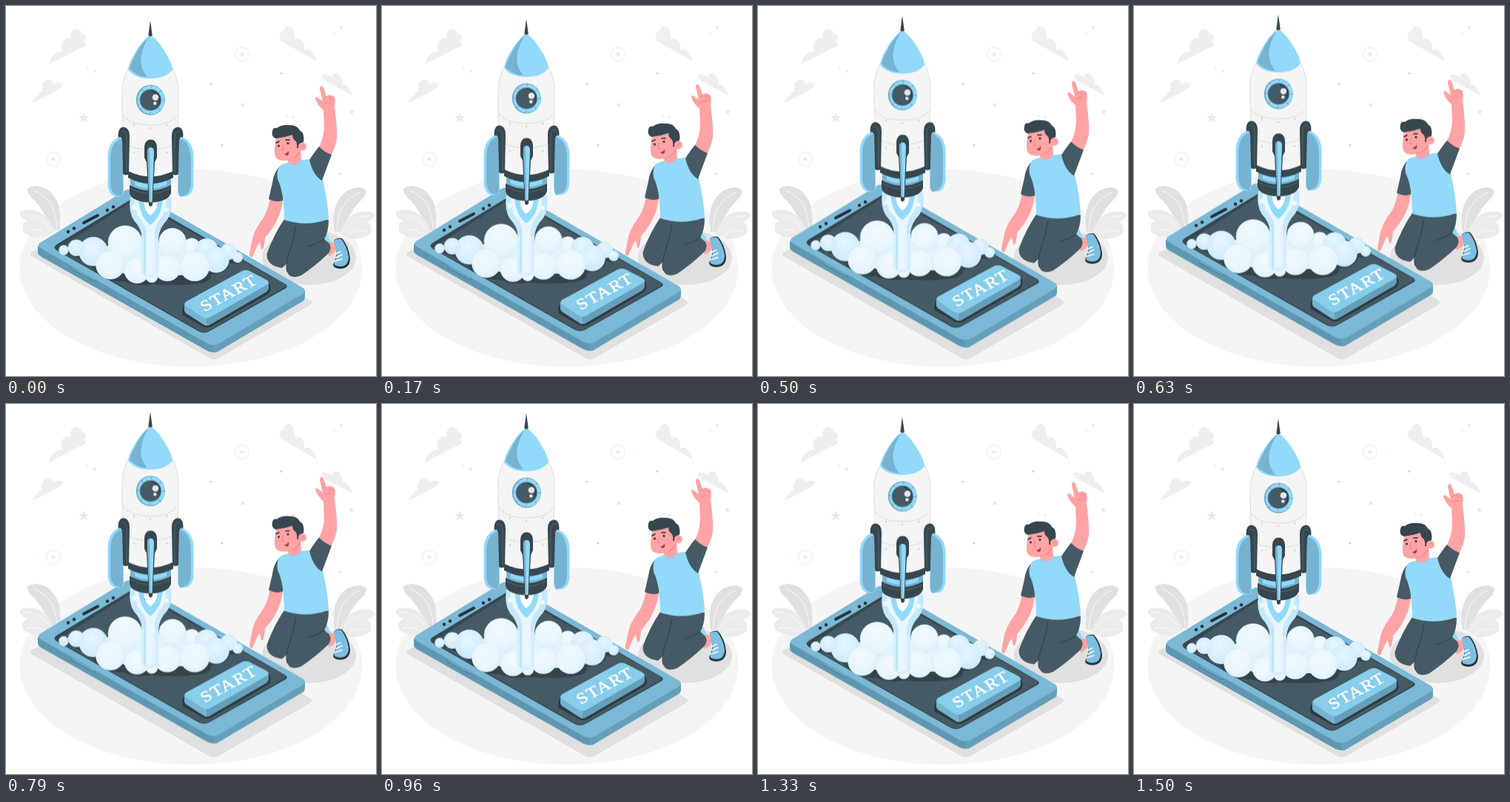
Animation of 500x500 px, one loop 1540 ms. Source, as an HTML page:

```html
<!DOCTYPE html>
<html lang="en">
<head>
<meta charset="utf-8">
<title>Rocket launch</title>
<style>
html, body { margin: 0; width: 100%; height: 100%; overflow: hidden; background: #fff; }
svg { display: block; width: 100vw; height: 100vh; }
#float { animation: float 1540ms -5ms infinite; }
/* 24 poses a second: 18 up, 18 down, one held */
@keyframes float {
  0% { transform: translateY(1px); animation-timing-function: steps(18); }
  48.65% { transform: translateY(-9px); animation-timing-function: steps(18); }
  97.3%, 100% { transform: translateY(1px); }
}
.blue { fill: #92d9fa; }
.mid { fill: #76b3d0; }
.dark { fill: #37474f; }
.slate { fill: #455a64; }
.skin { fill: #ffa3a4; }
.cloud { fill: #efefef; }
.line { fill: none; stroke-linecap: round; stroke-linejoin: round; }
</style>
</head>
<body>
<svg viewBox="0 0 500 500">
<defs>
  <radialGradient id="puff" cx=".45" cy=".35" r=".75">
    <stop offset="0" stop-color="#f1faff"/>
    <stop offset=".6" stop-color="#eaf7fe"/>
    <stop offset="1" stop-color="#d8effc"/>
  </radialGradient>
  <radialGradient id="tint" cx=".45" cy=".35" r=".8">
    <stop offset="0" stop-color="#e6f6fe"/>
    <stop offset="1" stop-color="#c8e8fa"/>
  </radialGradient>
  <path id="star" d="M0-7 2-2.2 7-2.2 3 1.2 4.4 6 0 3.2-4.4 6-3 1.2-7-2.2-2-2.2Z"/>
  <g id="target" fill="none" stroke="#e3edf1">
    <circle r="9.5"/><circle r="2.6" fill="#e3edf1" stroke="none"/>
  </g>
</defs>

<g id="sky">
  <path class="cloud" d="M58 79Q59 70 66 65Q71 60 76 62Q73 51 78 46Q82 42 87 44Q86 33 94 31Q101 30 102 38Q108 37 108 43Q107 47 104 49Q109 48 108 53Z"/>
  <path class="cloud" d="M36 131Q37 124 43 121Q44 116 49 116Q47 107 52 102Q57 98 61 101Q64 104 63 107Q69 102 76 104Q78 108 72 112Z"/>
  <path class="cloud" d="M420 75Q418 66 412 61Q408 58 403 59Q404 49 397 45Q393 43 390 45Q391 31 383 27Q376 26 376 34Q369 35 370 41Q368 45 373 48Z"/>
  <path class="cloud" d="M468 121Q467 113 461 109Q460 106 455 106Q455 97 449 92Q443 89 440 96Q433 91 427 93Q426 98 433 102Z"/>
  <g fill="#e9e9e9">
    <use href="#star" x="105" y="151"/>
    <use href="#star" transform="translate(320 134)scale(.6)"/>
    <use href="#star" transform="translate(467 143)scale(.6)"/>
  </g>
  <use href="#target" x="319" y="65"/>
  <use href="#target" x="64" y="207"/>
</g>

<ellipse cx="250" cy="354" rx="231.5" ry="133.5" fill="#f5f5f5"/>

<g id="plant">
  <path d="M72 303Q78 264 56 248Q39 239 29 247Q29 256 40 264Q52 278 62 303Z" fill="#e0e0e0"/>
  <path d="M66 305Q57 279 36 276Q20 274 18 281Q21 287 28 290Q19 296 24 306Q34 313 50 313Z" fill="#ebebeb"/>
  <path class="line" d="M38 250Q67 260 69 301M25 281Q50 282 61 304M28 303Q43 299 55 309" stroke="#f8f8f8"/>
</g>
<use href="#plant" transform="translate(516 2)scale(-1 1)"/>

<path d="M34 333Q31 336 36 339L275 476Q281 479 287 476L411 404Q416 400 410 397L180 264Q172 260 164 263Z" fill="#e0e0e0"/>
<ellipse cx="409.500" cy="340" rx="63.500" ry="37" fill="#e0e0e0"/>

<g id="float">
  <g id="phone">
    <path d="M43 323V332Q43 335 48 338L272 465Q280 469 288 465L280 440Z" fill="#5e97b1"/>
    <path d="M280 450V467Q284 468 288 465L401 398Q404 396 404 392V383Z" fill="#669fba"/>
    <path d="M46 319Q41 323 48 327L272 455Q280 459 288 455L401 388Q407 383 400 379L172 248Q166 245 160 249Z" fill="#7bb9d6"/>
    <path class="line" d="M90 354 119 370" stroke="#51879f" stroke-width="4"/>
    <path class="line" d="M90 353 119 369" stroke="#6eabc8" stroke-width="2"/>
    <g transform="translate(0 1.5)">
      <path class="dark" d="M68 320Q63 324 69 328L260 437Q268 441 275 437L378 379Q382 376 377 373L181 260Q174 256 167 260Z"/>
      <path class="slate" d="M72 324Q68 326 72 328L261 436Q268 440 275 436L376 378Q380 375 376 373L181 264Q174 260 167 264Z"/>
    </g>
    <path class="line" d="M105 292 124 282" stroke="#263238" stroke-width="4"/>
    <g id="holes" fill="#263238"></g>
    <path d="M240 405Q237 411 239 417L266 432Q272 435 278 432L354 388Q360 383 356 374Z" fill="#2c3b42"/>
    <path class="mid" d="M241 401V411Q242 414 246 416L266 429Q271 433 276 429L279 416Z"/>
    <path d="M271 418V431Q274 431 277 429L351 386Q355 383 355 380V371Z" fill="#669fba"/>
    <path d="M244 398Q239 401 244 405L265 419Q271 423 277 419L352 376Q357 372 352 369L329 357Q324 355 319 357Z" fill="#88cdec"/>
    <text transform="matrix(.88 -.48 .5 .7 268.500 412.500)" font-family="'Liberation Serif', serif" font-size="25" letter-spacing="1.5" fill="#fff" stroke="#fff" stroke-width=".6">START</text>
  </g>

  <g id="smoke" transform="translate(0 .8)">
    <path d="M72 331Q90 335 99 340Q116 350 122 358Q136 372 158 370Q178 378 198 374Q230 377 254 374Q279 372 277 361Q303 358 302 346Q318 348 321 340L300 325H100Z" fill="#33444c"/>
    <path d="M104 338 160 312 280 328 293 345 250 362H165Z" fill="#e3f4fd"/>
    <g id="puffs" stroke="#d0eaf8" stroke-width=".5"></g>
  </g>

  <g id="flame">
    <path d="M183 302V360Q195 372 206 360V302Z" fill="#d5effc"/>
    <path d="M168 257Q165 277 173 289Q183 299 184 313H206Q207 299 217 289Q226 277 223 257Z" fill="#c5e8fb"/>
    <path d="M174 260Q174 278 181 286Q190 296 189 309V362H201V309Q200 297 209 286Q217 277 216 260Z" fill="#e7f6fe"/>
    <path d="M188 303V361" class="line" stroke="#bce4f9" stroke-width="2.500"/>
    <path d="M179 258Q180 283 195 295Q211 283 212 258Z" fill="#92d9fa"/>
    <path d="M186 258Q186 276 195 282Q205 276 205 258Z" fill="#fff"/>
    <circle cx="173" cy="271" r="3.500" fill="#eef9ff"/>
    <circle cx="217" cy="274" r="3" fill="#eef9ff"/>
    <circle cx="179" cy="281" r="2" fill="#eef9ff"/>
  </g>

  <g id="rocket">
    <g id="fin">
      <path class="blue" d="M156 175Q138 180 137.500 203V241Q139 253 146 256L155 257Q159 255 159 248V176Z"/>
      <path class="mid" d="M157 178Q142 182 141 204V240Q142 250 148 254L155 256.500Q158 254 158 247Z"/>
    </g>
    <use href="#fin" transform="translate(391)scale(-1 1)"/>
    <path d="M167 80Q157 96 157 115L159 222Q195 244 231 222L233 115Q233 96 223 80Z" fill="#f5f5f5" stroke="#dedede"/>
    <path class="line" d="M158 146Q166 160 195 160Q224 160 232 146M158 181Q168 193 195 193Q222 193 232 181" stroke="#dcdcdc"/>
    <g id="rivets" fill="#cfcfcf"></g>

    <path class="blue" d="M195 38Q183 46 171 68Q166 77 165 85Q174 97 195 97Q216 97 225 85Q224 77 219 68Q207 46 195 38Z"/>
    <path class="mid" d="M193 41Q181 51 173 69Q168 78 167 84Q176 94 191 95Q180 82 183 65Q186 51 193 41Z"/>
    <path class="dark" d="M195 18.500 197.800 39Q195 41 192.300 39Z"/>

    <ellipse cx="195.300" cy="126" rx="19.500" ry="20.500" fill="#6ca7c3"/>
    <ellipse cx="196" cy="126" rx="18.500" ry="19.500" class="blue"/>
    <ellipse cx="195.500" cy="126" rx="17" ry="18" fill="none" stroke="#5f9ab6" stroke-width="4" stroke-dasharray=".8 13"/>
    <circle cx="195.300" cy="126" r="15" fill="#6aabc9"/>
    <circle cx="195.300" cy="126" r="14" class="slate"/>
    <path class="dark" d="M195 112A14 14 0 0 1 203 137.500Q212 126 195 112Z"/>
    <circle cx="202" cy="122.500" r="4.300" fill="#e6e6e6"/>
    <circle cx="201.300" cy="130.500" r="2.300" fill="#e6e6e6"/>

    <path class="mid" d="M168 230Q195 246 223 230V243Q195 258 168 243Z"/>
    <path class="blue" d="M174 235Q195 245 217 235V241Q195 250 174 241Z"/>
    <path class="dark" d="M165 222Q195 237 226 222V231Q195 247 165 231Z"/>
    <path class="dark" d="M167 241Q195 256 223 241V252Q220 260 208 263Q195 266 182 263Q169 260 167 252Z"/>
    <path class="line" d="M169 246Q195 260 221 246" stroke="#53676f"/>

    <g id="booster">
      <path class="dark" d="M151.500 174Q151.500 162.500 159 162.500Q167 163.500 167 175L166 226Q162 229 158 226L157 180Q155 174 152 177Z"/>
      <path class="line" d="M156 169Q163 166 163 178V223" stroke="#52666f"/>
    </g>
    <use href="#booster" transform="translate(391)scale(-1 1)"/>

    <path class="dark" d="M187 204V189Q188 179.500 195.500 179.500Q203 179.500 204 189V204L201 210 198 268Q195 272 193 268L190 210Z"/>
    <path class="blue" d="M191 196Q191 190 195.500 190Q200 190 200 196L197.500 264H193.500Z"/>
    <path class="mid" d="M191 196Q191 191 194 190.500L195 264H193.500Z"/>
  </g>

  <g id="man">
    <path class="skin" d="M357 258Q353 280 345 289Q334 304 332 318L329 334Q329 339 333 338L340 322 343 318 345 328Q349 329 350 312Q371 289 374 261Z"/>
    <path class="slate" d="M372 214Q362 222 360 238L355 260Q364 265 374 262L379 238Z"/>
    <path class="blue" d="M425 309 434 307 441 323 430 318Z"/>
    <path class="slate" d="M378 284Q361 309 352.500 334Q352 350 373 353L404 325 402 286Z"/>
    <path d="M443 316Q447 312 454 313Q463 323 465 340Q465 353 453 354Q442 354 442 348Q448 338 446 329Z" fill="#263238"/>
    <path d="M443 316Q447 313 453 314Q461 324 463 338Q463 350 453 351Q444 351 443 347Q449 338 446 329Z" fill="#7dbfe0"/>
    <path class="skin" d="M431 320Q440 316 444 320L446 329Q442 335 436 337Z"/>
    <path class="line" d="M445 334 452 331M446 339 454 335M444 344 454 341" stroke="#fff" stroke-width="1.600"/>
    <path class="slate" d="M393 288H436Q436 304 430 314L437 320Q441 327 435 334Q417 351 399 363Q382 370 379 355Q380 339 391 310Z"/>
    <path class="line" d="M391 297Q390 312 383 331Q377 349 380 358M430 314Q420 321 408 324" stroke="#33444c" stroke-width="1.200"/>

    <path class="skin" d="M429 137 444 135Q448 166 447 179Q444 193 438 203L421 193Q429 180 430 163Z"/>
    <path class="skin" d="M429 140Q420 132 418 124Q419 120 423 124L428 128 424 111Q424 107 427 107Q429 108 430 112L433 121Q438 117 444 122Q446 130 443 138Z"/>
    <path class="line" d="M431 124 434 121M437 121 438 126M441 122 442 127M431 131Q436 128 440 130" stroke="#e57f83" stroke-width=".8"/>
    <path class="blue" d="M371 214Q383 208 412 206Q420 218 428 234Q435 263 436 287Q406 298 376 288Q376 251 367 233Q365 220 371 214Z"/>
    <path class="slate" d="M410 207Q417 196 423 189Q431 197 440 200L427 235Q415 228 410 207Z"/>

    <path class="skin" d="M379 199 382 212Q392 217 399 207L398 188Z"/>
    <path class="line" d="M381 207Q392 205 396 197" stroke="#e98185" stroke-width="1.500"/>
    <path class="skin" d="M366 174Q361 194 364 203Q369 210 382 207Q395 204 398 189L399 170Z"/>
    <path class="dark" d="M364 178Q358 175 360 168Q361 163 366 164Q373 159 382 160Q393 159 397 167Q404 171 402 183Q397 184 396 191L393 191Q394 184 391 181Q387 178 387 173Q376 177 364 178Z"/>
    <circle cx="400.500" cy="189" r="5.500" class="skin"/>
    <path class="line" d="M399 190Q401 186 403 187" stroke="#e57f83"/>
    <path class="line" d="M365 184 369 182M378 180 383 180" stroke="#263238" stroke-width="1.500"/>
    <circle cx="368.500" cy="188" r="1.500" fill="#263238"/>
    <circle cx="381" cy="184.500" r="1.500" fill="#263238"/>
    <path class="line" d="M374 187 373 194 376 194" stroke="#e57f83"/>
    <path d="M376 199Q380 198 382 195Q383 201 379 201Z" fill="#9b3f48"/>
  </g>
</g>
</svg>
<script>
const circles = (id, list, fill) => {
  const group = document.getElementById(id);
  for (const [cx, cy, r, tone] of list) {
    const dot = document.createElementNS('http://www.w3.org/2000/svg', 'circle');
    const attrs = { cx, cy, r, ...(tone || fill ? { fill: tone || fill } : {}) };
    for (const name in attrs) dot.setAttribute(name, attrs[name]);
    group.append(dot);
  }
};
const tint = 'url(#tint)';
circles('sky', [[277, 105, 1.5], [372, 91, 1.5], [292, 188, 1.5]], '#cfcfcf');
circles('sky', [[120, 88, 1.8], [110, 83, 1], [453, 29, 1.7], [444, 36, 1],
  [388, 150, 1.5], [380, 149, 1], [451, 227, 1.8]], '#e6e6e6');
circles('holes', [[84, 304, 2.2], [92, 299.500, 2.2], [137, 275, 2.2], [145, 270.500, 2.2]]);
circles('rivets', [[173, 160, 1.2], [195, 164, 1.2], [217, 160, 1.2],
  [173, 197, 1.2], [217, 197, 1.2]]);
circles('puffs', [
  [251, 323, 11], [225, 317, 18.5], [161, 318, 23], [271, 328, 15.5, tint], [118, 330, 19.5, tint],
  [95, 325, 11, tint], [78, 328, 6.5, tint], [301, 330, 11, tint], [313, 338, 7, tint],
  [284, 341, 17.5, tint], [141, 348, 19.5], [255, 350, 20], [218, 352, 18],
  [177, 356, 17], [197, 364, 8]
], 'url(#puff)');
</script>
</body>
</html>
```
